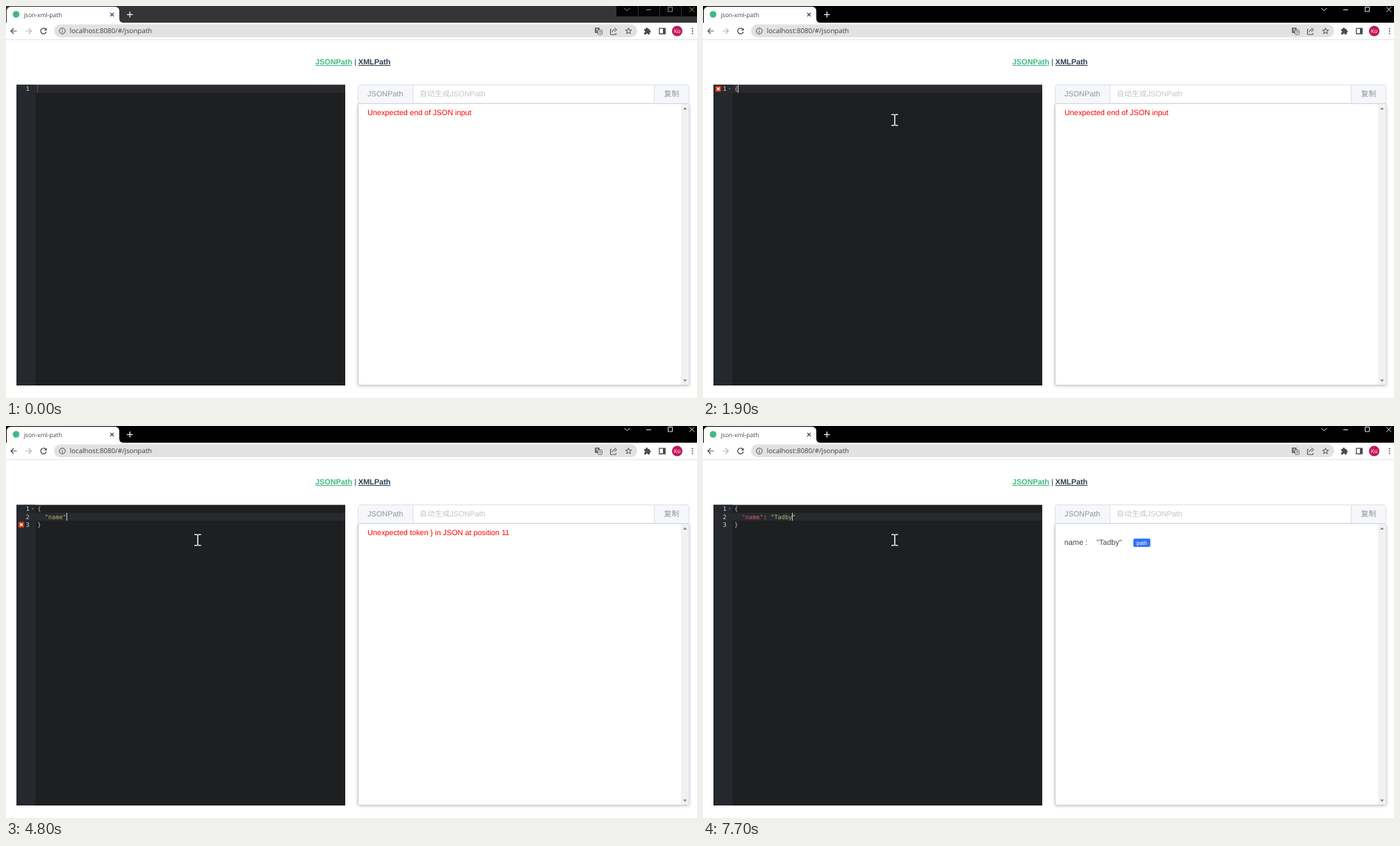
Write an HTML page with a canvas that moves like this. It is 994 by 564 pixels and loops after 8000 ms.

```html
<!DOCTYPE html>
<html lang="en">
<head>
<meta charset="utf-8">
<title>json-xml-path</title>
<style>
html, body { margin: 0; width: 100%; height: 100%; overflow: hidden; background: #fff; }
canvas { display: block; }
</style>
</head>
<body>
<canvas id="stage" width="994" height="564"></canvas>
<script>
const ctx = document.getElementById('stage').getContext('2d');
const LOOP = 8000;
const SANS = '"Liberation Sans", Arial, "Noto Sans CJK SC", "Noto Sans CJK", sans-serif';
const UI = '"Open Sans", "Noto Sans", sans-serif';
const MONO = '"DejaVu Sans Mono", monospace';
const CHAR = 5.19, ROW = 11.4, CODE_X = 45.3, TOP = 113.5;
const FOCUS = 700, ENTER = 2300;

// The bar marks the caret in the edited line.
const edits = [
  [0, '|'], [1600, '{|'], [ENTER, '  |'], [3300, '  "|"'],
  [4000, '  "n|"'], [4100, '  "na|"'], [4200, '  "nam|"'], [4300, '  "name|"'],
  [4800, '  "name"|'], [5200, '  "name":|'], [5500, '  "name": |'], [5800, '  "name": "|"'],
  [6800, '  "name": "T|"'], [7000, '  "name": "Ta|"'], [7200, '  "name": "Tad|"'],
  [7600, '  "name": "Tadb|"'], [7700, '  "name": "Tadby|"']
];
const blinks = [[1300, 1600], [3000, 3300], [3800, 4000], [6300, 6700]];

const within = (t, a, b) => t >= a && t < b;

function rect(x, y, w, h, color) {
  ctx.fillStyle = color;
  ctx.fillRect(x, y, w, h);
}

function round(x, y, w, h, r, color, stroke) {
  ctx.beginPath();
  ctx.roundRect(x, y, w, h, r);
  if (color) { ctx.fillStyle = color; ctx.fill(); }
  if (stroke) { ctx.strokeStyle = stroke; ctx.lineWidth = 1; ctx.stroke(); }
}

function disc(x, y, r, color) {
  ctx.beginPath();
  ctx.arc(x, y, r, 0, 7);
  ctx.fillStyle = color;
  ctx.fill();
}

function path(d, color, width = 1.2, fill) {
  const p = new Path2D(d);
  if (fill) { ctx.fillStyle = color; ctx.fill(p); return; }
  ctx.strokeStyle = color;
  ctx.lineWidth = width;
  ctx.stroke(p);
}

function text(s, x, y, font, color, align = 'left') {
  ctx.font = font;
  ctx.fillStyle = color;
  ctx.textAlign = align;
  ctx.fillText(s, x, y);
  return ctx.measureText(s).width;
}

const label = (s, x, y, color) => text(s, x, y, '10.85px ' + SANS, color);

function windowButtons(active) {
  const c = active ? '#e8e8e8' : '#8c8c8c';
  if (!active) {
    rect(878, 0, 116, 15, '#050505');
    for (const x of [909, 940, 971]) rect(x, 0, 1, 15, '#303030');
  }
  path('M889.5 3 L893.5 7 L897.5 3', c, 1);
  rect(921, 5, 7, 1, c);
  path('M952.5 1.5 H958.5 V8 H952.5 Z', c, 1);
  path('M983 1.5 L990 8.5 M990 1.5 L983 8.5', c, 1);
}

function toolbarIcons() {
  const dark = '#4a4d51';
  path('M15.5 36 H7 M11 32 L7 36 L11 40', dark);
  path('M28 36 H36.5 M32.5 32 L36.5 36 L32.5 40', '#b4b6b9');
  path('M57.4 33.6 A4.1 4.1 0 1 0 58 37', dark, 1.3);
  path('M58.6 31.4 V35.2 H54.8 Z', dark, 1, true);

  path('M85.2 36 A4.2 4.2 0 1 1 76.8 36 A4.2 4.2 0 1 1 85.2 36', dark, 1);
  rect(80.5, 35.5, 1, 3, dark);
  rect(80.5, 33.5, 1, 1, dark);

  round(847, 31, 7, 8, 1, '#6a6d71');
  round(851.5, 34.5, 6, 6.5, 1, '#e4e4e4', '#6a6d71');
  path('M848.8 33.5 H852 M850.4 32.5 V36.5 M853 37 H856.5 M854.7 36 V39.5', '#dcdcdc', .8);
  path('M853 37 H856.5 M854.7 36 V39.5', '#6a6d71', .8);

  path('M871 33.5 H869.5 V41 H877.5 V39', dark, 1);
  path('M871.5 38 Q872 34 876 34 M875 31.5 L878.5 34.2 L875 37', dark, 1);

  let star = '';
  for (let i = 0; i < 10; i++) {
    const r = i % 2 ? 1.9 : 4.6, a = i * Math.PI / 5;
    star += (i ? 'L' : 'M') + (895.5 + r * Math.sin(a)) + ' ' + (36.2 - r * Math.cos(a));
  }
  path(star + 'Z', dark, 1);

  round(918, 33, 8, 8, 1, dark);
  disc(921.8, 32.6, 1.5, dark);
  disc(926, 36.8, 1.5, dark);
  disc(918.2, 37, 1.2, '#fff');
  disc(922, 40.8, 1.2, '#fff');

  path('M939.8 32.2 H948.2 V40 H939.8 Z', dark, 1.3);
  rect(945, 32, 3.5, 8, dark);

  disc(965.5, 36, 7.6, '#c2185b');
  text('Ko', 965.5, 38.8, '8px ' + UI, '#fff', 'center');
  for (const y of [32.5, 36, 39.5]) disc(987.5, y, 1, dark);
}

function browser(active) {
  rect(0, 0, 994, 24, active ? '#000' : '#353535');
  windowButtons(active);
  round(1, 1, 162, 28, 6, '#fff');
  path('M163 24 V18 Q163 24 169 24 Z', '#fff', 1, true);
  rect(0, 24, 994, 24, '#fff');
  rect(0, 48, 994, 1, '#e3e3e3');
  disc(14.5, 12, 4.8, '#41b883');
  text('json-xml-path', 25.7, 15.5, '8.5px ' + UI, '#3c4043');
  path('M150 9.8 L155 14.8 M155 9.8 L150 14.8', '#303236', 1.2);
  path('M174 12.3 H182.5 M178.25 8 V16.5', '#f4f4f4', 1.3);
  round(69, 26.5, 839, 18.5, 9.2, '#e2e2e2');
  text('localhost:8080/#/jsonpath', 91.8, 39.2, '9.7px ' + UI, '#3c4043');
  toolbarIcons();
}

function link(s, x, color) {
  const w = text(s, x, 83.6, 'bold 10.85px ' + SANS, color);
  rect(x, 85, w, 1, color);
}

function errorMark(row) {
  const y = TOP + row * ROW + 1.5;
  round(17.8, y, 8.2, 8.4, 1, '#c9341f');
  path(`M20 ${y + 2.2} l4 4 m0 -4 l-4 4`, '#fff', 1.3);
}

function code(s, col, row, color) {
  text(s, CODE_X + col * CHAR, 122.3 + row * ROW, '8.62px ' + MONO, color);
}

function editor(t, line, col) {
  const plain = '#c5c8c6', string = '#b5bd68', row = t < ENTER ? 0 : 1;
  rect(15, TOP, 473, 432.5, '#1d1f21');
  rect(15, TOP, 27.5, 432.5, '#25282c');
  rect(15, TOP + row * ROW, 473, ROW, '#282a2e');

  for (let i = 0; i < (row ? 3 : 1); i++)
    text(i + 1, 33.7, 122.3 + i * ROW, '8.62px ' + MONO, '#d5d8d6', 'right');
  if (t >= 1700) path('M36.8 118.3 H40 L38.4 120.2 Z', '#777b7e', 1, true);
  if (within(t, 1900, 2400)) errorMark(0);
  if (within(t, 3500, 6000)) errorMark(2);

  if (row) {
    const [key, value] = line.split(':');
    const pair = value !== undefined;
    code('{', 0, 0, plain);
    code('}', 0, 2, plain);
    code(key.trim(), 2, 1, pair ? '#cc6666' : string);
    if (pair) {
      code(':', 8, 1, plain);
      code(value.trim(), 10, 1, string);
    }
  } else code(line, 0, 0, plain);

  if (!blinks.some(([a, b]) => within(t, a, b)))
    rect(Math.round(CODE_X + col * CHAR), TOP + row * ROW, 1, ROW, t < FOCUS ? '#55585a' : '#d2d3d1');
}

function result(t, line) {
  ctx.save();
  ctx.shadowColor = 'rgba(0,0,0,.25)';
  ctx.shadowBlur = 4;
  ctx.shadowOffsetY = 1;
  round(506, 140.5, 477, 405, 2, '#fff');
  ctx.restore();
  round(506.5, 140.5, 476, 405, 2, '#fff', '#c9ccd2');
  rect(971, 141, 11.5, 404, '#f1f1f1');
  path('M974 149 H979.5 L976.75 145.8 Z', '#858585', 1, true);
  path('M974 537.5 H979.5 L976.75 540.7 Z', '#858585', 1, true);

  round(506.5, 113.5, 476, 26.5, 3, '#fff', '#dcdfe6');
  round(507, 114, 78, 25.5, [3, 0, 0, 3], '#f5f7fa');
  round(932, 114, 50, 25.5, [0, 3, 3, 0], '#f5f7fa');
  rect(585, 114, 1, 26, '#dcdfe6');
  rect(932, 114, 1, 26, '#dcdfe6');
  label('JSONPath', 520, 130.4, '#909399');
  label('自动生成JSONPath', 595, 130.4, '#c0c4cc');
  label('复制', 946.6, 130.4, '#909399');

  const value = line.match(/: (".*")$/);
  if (value) {
    label('name :', 519.8, 171, '#3c4654');
    const x = 566 + label(value[1], 566, 171, '#4a4a4a') + 16.4;
    round(x, 162, 24.5, 12, 2, '#2f74f5');
    text('path', x + 12.2, 170.6, '7.9px ' + SANS, '#fff', 'center');
  } else if (t < ENTER) {
    label('Unexpected end of JSON input', 520, 157.4, '#f00');
  } else if (line.trim()) {
    label('Unexpected token } in JSON at position ' + (line.length + 3), 520, 157.4, '#f00');
  }
}

function pointer(t) {
  if (t < 200) return;
  const k = Math.min(1, (t - 100) / 600), j = 1 - k;
  const curve = (a, b, c) => Math.round(j * j * a + 2 * j * k * b + k * k * c);
  const x = curve(400, 300, 275), y = curve(125, 185, 164);
  rect(x, y - 8, 1.6, 16, '#f2f2f2');
  for (const dy of [-8.5, 7]) {
    rect(x - 4, y + dy, 4, 1.5, '#f2f2f2');
    rect(x + 1.5, y + dy, 4, 1.5, '#f2f2f2');
  }
}

function draw(t) {
  const edit = edits.filter(e => e[0] <= t).pop()[1];
  const line = edit.replace('|', '');
  rect(0, 0, 994, 564, '#fff');
  browser(t >= FOCUS);
  link('JSONPath', 445, '#42b983');
  label('|', 501, 83.6, '#2c3e50');
  link('XMLPath', 506.8, '#2c3e50');
  editor(t, line, edit.indexOf('|'));
  result(t, line);
  pointer(t);
}

ctx.textRendering = 'geometricPrecision';
const start = performance.now();
function tick() {
  const t = (performance.now() - start) % LOOP;
  draw(Math.floor(t / 100) * 100);
  requestAnimationFrame(tick);
}
tick();
</script>
</body>
</html>
```
